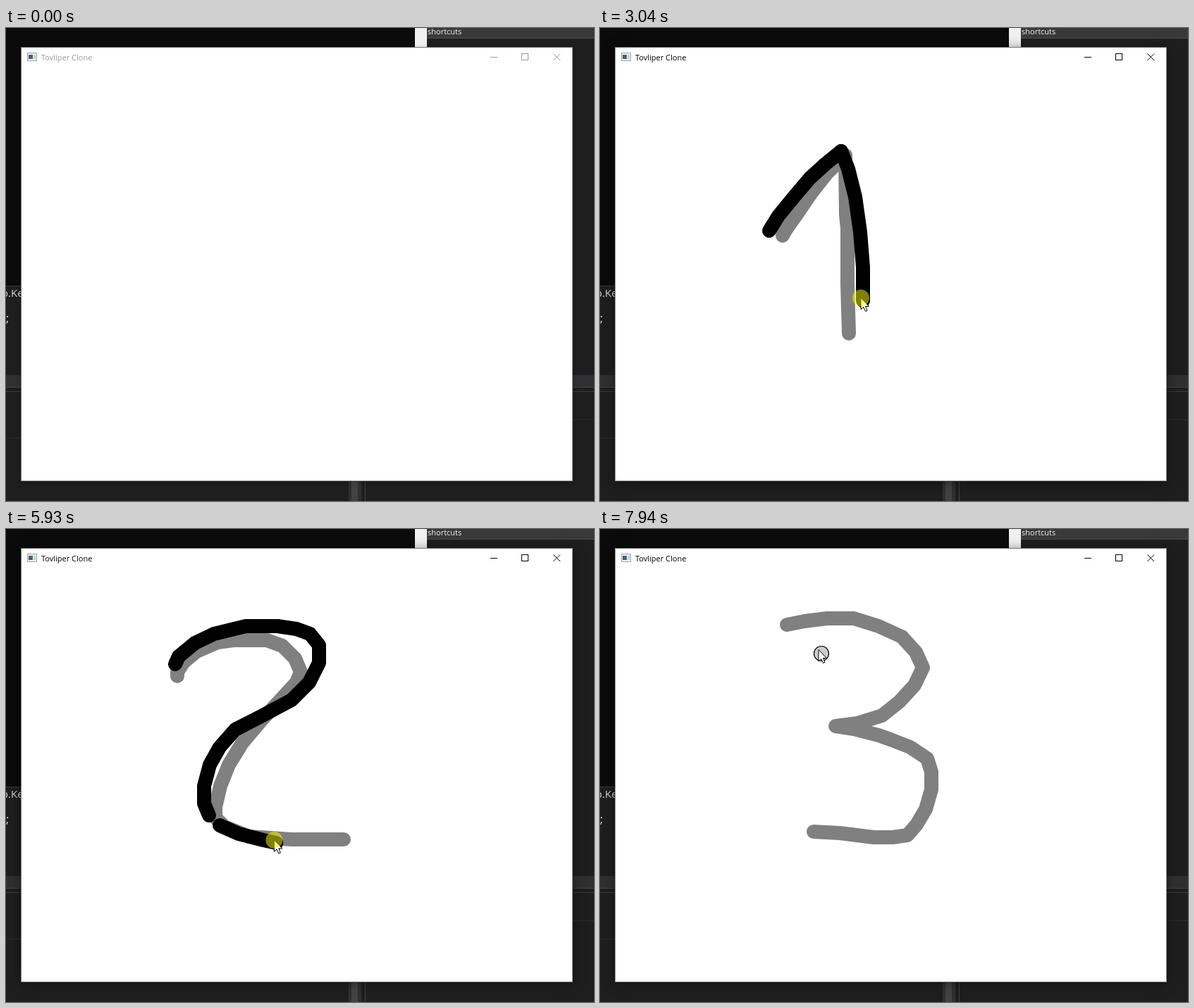
An HTML page with a canvas that plays this animation: 834x672 px, repeating every 8000 ms.

```html
<!DOCTYPE html>
<html lang="en">
<head>
<meta charset="utf-8">
<title>Tovliper Clone</title>
<style>
  html, body { margin: 0; width: 100%; height: 100%; overflow: hidden; background: #1e1e1e; }
  canvas { display: block; }
</style>
</head>
<body>
<canvas id="stage" width="834" height="672"></canvas>
<script>
const ctx = document.getElementById('stage').getContext('2d');
const LOOP = 8000;
const ACTIVATE = 470;
const FLIPS = [2010, 3400, 4850, 6130, 7680];

// Pointer moves: page drawn on (0 = hovering), start and end in ms, waypoints.
const MOVES = [
  [0, 70, 70, '668,615'],
  [0, 140, 140, '433,412'],
  [0, 200, 200, '295,306'],
  [0, 270, 270, '293,306'],
  [0, 470, 880, '293,306 259,295'],

  [1, 890, 960, '259,295 264,286'],
  [1, 960, 1240, '264,286 281,262 300,234 322,206 348,181'],
  [1, 1370, 1800, '348,181 349,265 351,285 351,365 353,434'],
  [0, 2000, 2270, '353,434 345,330 284,263'],
  [0, 2270, 2440, '284,263 240,288'],

  [2, 2450, 2750, '240,288 253,267 275,240 298,213 320,193 342,175'],
  [2, 2750, 2970, '342,175 352,200 362,240 369,290 373,340'],
  [2, 2970, 3150, '373,340 373,423 368,460'],
  [0, 3450, 3790, '368,460 243,209'],

  [3, 3850, 3920, '243,209 243,203 252,189'],
  [3, 3920, 4610, '252,189 270,174 300,161 322,158 370,158 392,166 410,184 418,203 412,218 ' +
    '390,242 362,272 335,304 316,335 304,365 297,395 297,410 310,423 345,437 405,441 479,441'],
  [0, 4750, 5080, '479,441 240,192'],

  [4, 5110, 5170, '240,192 245,181'],
  [4, 5170, 5440, '245,181 268,162 295,149 340,138 385,138'],
  [4, 5440, 5830, '385,138 412,142 431,149 444,165 444,190 430,218 405,243 360,267 325,285 ' +
    '303,310 289,335 281,365 281,390 288,407'],
  [0, 5830, 5860, '288,407 303,421'],
  [4, 5860, 6040, '303,421 330,433 365,442 415,453 452,455 485,452 512,450'],
  [0, 6120, 6440, '512,450 265,136'],

  [5, 6470, 6680, '265,136 290,131 322,127 360,127 395,138 428,153'],
  [5, 6680, 7100, '428,153 448,175 458,197 446,222 425,245 400,265 365,276 334,280 360,284 ' +
    '395,293 412,299'],
  [5, 7100, 7500, '412,299 440,310 464,326 470,345 470,370 462,398 449,420 436,435 415,438 ' +
    '388,438 340,432 303,430'],
  [0, 7700, 7940, '303,430 314,177'],
].map(([page, start, end, text]) => ({
  page, start, end, points: text.split(' ').map(p => p.split(',').map(Number)),
}));

function rect(color, x, y, w, h) {
  ctx.fillStyle = color;
  ctx.fillRect(x, y, w, h);
}

function label(text, x, y, size, color) {
  ctx.font = `${size}px "Open Sans", "Noto Sans", sans-serif`;
  ctx.fillStyle = color;
  ctx.fillText(text, x, y);
}

function disc(x, y, r, fill) {
  ctx.beginPath();
  ctx.arc(x, y, r, 0, Math.PI * 2);
  ctx.fillStyle = fill;
  ctx.fill();
}

// The part of a move covered at time t, at constant speed.
function travelled({ start, end, points }, t) {
  const lengths = points.slice(1).map((p, i) => Math.hypot(p[0] - points[i][0], p[1] - points[i][1]));
  const done = end > start ? Math.min(1, (t - start) / (end - start)) : 1;
  let left = done * lengths.reduce((a, b) => a + b, 0);
  const path = [points[0]];
  for (let i = 0; i < lengths.length && left > 0; i++) {
    const f = Math.min(1, left / lengths[i]);
    const [a, b] = [points[i], points[i + 1]];
    path.push([a[0] + (b[0] - a[0]) * f, a[1] + (b[1] - a[1]) * f]);
    left -= lengths[i];
  }
  return path;
}

function drawDesktop() {
  rect('#1e1e1e', 0, 0, 834, 672);
  rect('#0b0b0b', 0, 0, 580, 366);
  rect('#3b3b3d', 0, 366, 22, 1);
  rect('#f0f0f0', 580, 0, 17, 28);
  rect('#39393a', 597, 0, 237, 14);
  rect('#4b4b4b', 597, 14, 237, 1);
  rect('#303032', 0, 493, 834, 17);
  rect('#434345', 0, 510, 834, 1);
  rect('#3c3c3e', 0, 516, 834, 1);
  rect('#2d2d2f', 0, 582, 22, 1);
  rect('#2d2d2f', 804, 556, 30, 1);
  rect('#2f2f31', 486, 644, 18, 28);
  rect('#424244', 490, 644, 9, 28);
  rect('#404042', 509, 644, 1, 28);
  label('shortcuts', 598, 9, 11, '#f4f4f4');
  label('o.Ke', -6, 382, 15, '#d2dcd2');
  label(';', 0, 418, 16, '#dcdcdc');
}

function drawWindow(active) {
  ctx.save();
  ctx.shadowColor = `rgba(0,0,0,${active ? 0.5 : 0.3})`;
  ctx.shadowBlur = active ? 16 : 8;
  ctx.shadowOffsetY = 2;
  rect('#fff', 22, 28, 781, 615);
  ctx.restore();
  ctx.lineWidth = 1;
  ctx.strokeStyle = '#777';
  ctx.strokeRect(21.5, 27.5, 782, 616);

  ctx.strokeStyle = '#a0a0a0';
  rect('#eef1f2', 30, 35, 14, 12);
  ctx.strokeRect(30.5, 35.5, 13, 11);
  rect('#45637a', 32, 38, 6, 6);
  rect('#c9d3d6', 39, 38, 3, 6);

  const ink = active ? '#000' : '#999';
  label('Tovliper Clone', 50, 46, 11, ink);
  ctx.strokeStyle = ink;
  ctx.strokeRect(731.5, 36.5, 9, 9);
  ctx.beginPath();
  ctx.moveTo(687, 41.5); ctx.lineTo(697, 41.5);
  ctx.moveTo(776.5, 36.5); ctx.lineTo(786, 46);
  ctx.moveTo(786, 36.5); ctx.lineTo(776.5, 46);
  ctx.stroke();
}

function drawPage(page, color, t) {
  ctx.strokeStyle = color;
  ctx.lineWidth = 20;
  ctx.lineCap = ctx.lineJoin = 'round';
  for (const move of MOVES) {
    if (move.page !== page || t < move.start) continue;
    const path = travelled(move, t);
    if (path.length < 2) path.push(path[0]);
    ctx.beginPath();
    path.forEach(([x, y], i) => i ? ctx.lineTo(x, y) : ctx.moveTo(x, y));
    ctx.stroke();
  }
  ctx.lineCap = 'butt';
  ctx.lineJoin = 'miter';
}

function drawArrow(x, y) {
  ctx.save();
  ctx.translate(x, y);
  ctx.beginPath();
  ctx.moveTo(0, 0);
  for (const [px, py] of [[0, 16.5], [3.8, 13], [6.4, 19], [9, 18], [6.5, 12], [11.5, 12]]) ctx.lineTo(px, py);
  ctx.closePath();
  ctx.fillStyle = '#fff';
  ctx.fill();
  ctx.strokeStyle = '#000';
  ctx.lineWidth = 1;
  ctx.stroke();
  ctx.restore();
}

function drawPointer(t) {
  const move = MOVES.filter(m => m.start <= t).pop();
  if (!move) return;
  const [x, y] = travelled(move, t).pop();
  if (move.page && t < move.end + 130 && move.page === currentPage(t)) {
    drawArrow(x - 3, y - 4);
    disc(x - 3, y - 4, 12, 'rgba(255,255,0,0.5)');
  } else {
    disc(x, y, 10.5, 'rgba(0,0,0,0.2)');
    ctx.strokeStyle = '#000';
    ctx.lineWidth = 1.2;
    ctx.stroke();
    drawArrow(x - 4, y - 5.5);
  }
}

const currentPage = t => 1 + FLIPS.filter(f => f <= t).length;

function draw(t) {
  drawDesktop();
  drawWindow(t >= ACTIVATE);
  const page = currentPage(t);
  if (page > 1) drawPage(page - 1, '#808080', t);
  drawPage(page, '#000', t);
  drawPointer(t);
}

const begin = performance.now();
function tick() {
  draw((performance.now() - begin) % LOOP);
  requestAnimationFrame(tick);
}
tick();
</script>
</body>
</html>
```
